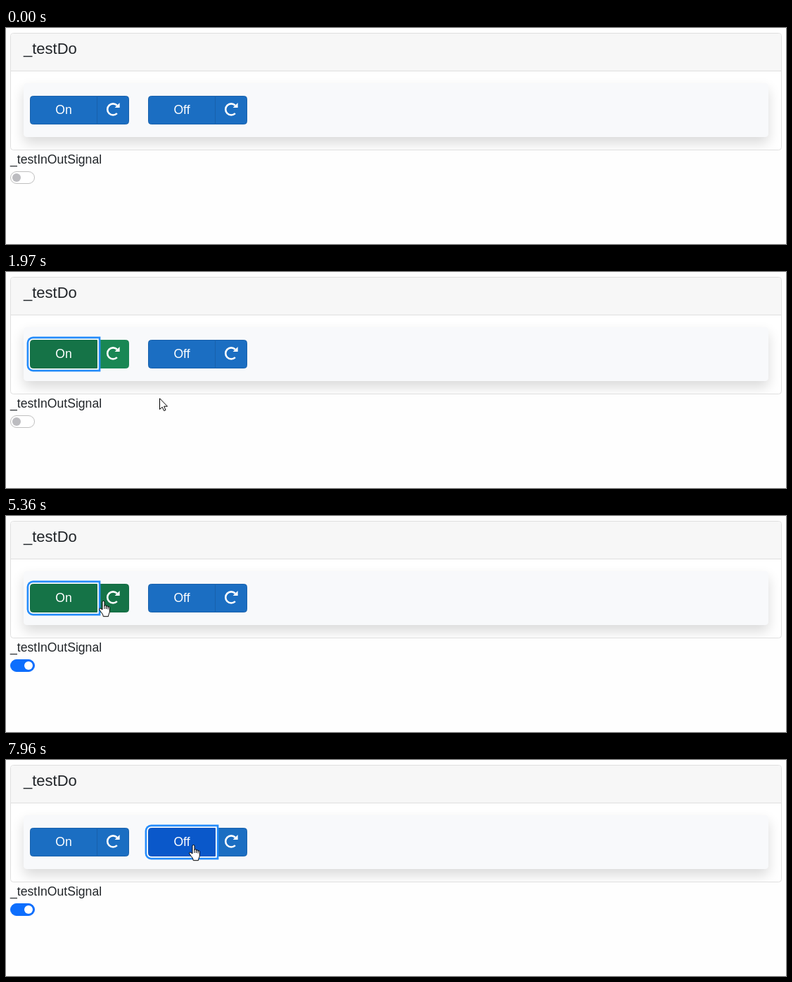
An HTML page that plays this animation: 1109 by 309 pixels, repeating every 8000 ms.

```html
<!DOCTYPE html>
<html lang="en">
<head>
<meta charset="utf-8">
<title>Signal buttons</title>
<style>
:root {
  --blue: #1b6ec2; --blue-edge: #1861ac;
  --blue-dark: #0b5ed7; --blue-dark-edge: #0a58ca;
  --green: #198754; --green-dark: #157347; --green-dark-edge: #146c43;
  --no-ring: 0 0 0 0 #fff, 0 0 0 0 #258cfb;
  --ring: 0 0 0 1.76px #fff, 0 0 0 4.4px #258cfb;
}
* { box-sizing: border-box; }
html, body { margin: 0; width: 1109px; height: 309px; overflow: hidden; }
body {
  position: relative; background: #fefefe; color: #212529;
  font: 17.6px/26.4px "Liberation Sans", Arial, sans-serif;
}
body > *, .panel, .btn, .knob, #cursor svg { position: absolute; }

.card {
  left: 6px; top: 7px; width: 1097px; height: 168px;
  background: #fff; border: 1px solid #dfdfdf; border-radius: 4.4px; overflow: hidden;
}
.head {
  height: 54px; padding: 8.8px 18px; background: #f7f7f7;
  border-bottom: 1px solid #dfdfdf; font-size: 22px;
}
.panel {
  left: 18px; top: 71px; width: 1059px; height: 77px;
  background: #f8f9fb; border-radius: 4.4px;
  box-shadow: 0 8.8px 17.6px rgba(0, 0, 0, .15);
}
.btn {
  top: 97px; height: 41px; line-height: 39px; text-align: center; color: #fff;
  background: var(--blue); border: 1px solid var(--blue-edge);
  animation: 8s step-end infinite;
}
.main { width: 96px; border-radius: 4.4px 0 0 4.4px; }
.redo { width: 46px; border-radius: 0 4.4px 4.4px 0; z-index: 1; }
.redo svg { position: absolute; left: 13px; top: 9px; width: 18.6px; height: 18.6px; overflow: visible; }
#on { left: 34px; animation-name: on; }
#on-redo { left: 129px; animation-name: on-redo; }
#off { left: 202px; animation-name: off; }
#off-redo { left: 297px; }

.label { left: 6px; top: 175px; }
.switch {
  left: 6px; top: 205px; width: 35px; height: 18px;
  border: 1px solid #bfbfbf; border-radius: 9px; background: #fff;
  animation: switch 8s step-end infinite;
}
.knob {
  left: 2px; top: 2px; width: 12px; height: 12px; border-radius: 50%;
  background: #bcbcc0; animation: knob 8s step-end infinite;
}

#cursor { left: 0; top: 0; z-index: 5; animation: move 8s step-end infinite; }
#cursor svg { overflow: visible; fill: #fff; stroke: #000; stroke-linejoin: round; left: 0; top: 0; }
#arrow { animation: arrow 8s step-end infinite; }
#hand { animation: hand 8s step-end infinite; }

@keyframes on {
  0% { background: var(--blue); border-color: var(--blue-edge); }
  12% { background: var(--blue); border-color: var(--blue-edge); animation-timing-function: steps(2, start); }
  13.75% { background: var(--blue-dark); border-color: var(--blue-dark-edge); box-shadow: var(--no-ring); z-index: 0; }
  14.5% { background: #0a58ca; border-color: #0a53be; box-shadow: var(--no-ring); z-index: 2; animation-timing-function: steps(2, start); }
  16.25% { background: var(--blue-dark); border-color: var(--blue-dark-edge); box-shadow: var(--ring); z-index: 2; }
  22.875% { background: var(--blue-dark); border-color: var(--blue-dark-edge); box-shadow: var(--ring); z-index: 2; animation-timing-function: steps(3, start); }
  25.5% { background: var(--green-dark); border-color: var(--green-dark-edge); box-shadow: var(--ring); z-index: 2; }
  76.375% { background: var(--green-dark); border-color: var(--green-dark-edge); box-shadow: var(--ring); z-index: 0; animation-timing-function: steps(2, start); }
  78.125% { background: var(--green); border-color: var(--green); box-shadow: var(--no-ring); z-index: 0; }
  85.625% { background: var(--green); border-color: var(--green); box-shadow: var(--no-ring); z-index: 0; animation-timing-function: steps(3, start); }
  88.25%, 100% { background: var(--blue); border-color: var(--blue-edge); box-shadow: var(--no-ring); z-index: 0; }
}
@keyframes on-redo {
  0% { background: var(--blue); border-color: var(--blue-edge); }
  22.875% { background: var(--blue); border-color: var(--blue-edge); animation-timing-function: steps(3, start); }
  25.5% { background: var(--green); border-color: var(--green); }
  54.25% { background: var(--green); border-color: var(--green); animation-timing-function: steps(2, start); }
  56% { background: var(--green-dark); border-color: var(--green-dark-edge); }
  61.06% { background: var(--green); border-color: var(--green); animation-timing-function: steps(2, start); }
  62.8% { background: var(--green-dark); border-color: var(--green-dark-edge); }
  67.875% { background: var(--green-dark); border-color: var(--green-dark-edge); animation-timing-function: steps(2, start); }
  69.6% { background: var(--green); border-color: var(--green); }
  73.75% { background: var(--green); border-color: var(--green); animation-timing-function: steps(2, start); }
  75.5% { background: var(--green-dark); border-color: var(--green-dark-edge); box-shadow: var(--no-ring); }
  76.375% { background: #146c43; border-color: #13653f; box-shadow: var(--no-ring); animation-timing-function: steps(2, start); }
  78.125% { background: var(--green-dark); border-color: var(--green-dark-edge); box-shadow: var(--ring); }
  85.625% { background: var(--green-dark); border-color: var(--green-dark-edge); box-shadow: var(--ring); animation-timing-function: steps(3, start); }
  88.25% { background: var(--blue-dark); border-color: var(--blue-dark-edge); box-shadow: var(--ring); }
  97.75% { background: var(--blue-dark); border-color: var(--blue-dark-edge); box-shadow: var(--ring); animation-timing-function: steps(2, start); }
  99.4%, 100% { background: var(--blue); border-color: var(--blue-edge); box-shadow: var(--no-ring); }
}
@keyframes off {
  0% { background: var(--blue); border-color: var(--blue-edge); }
  96% { background: var(--blue); border-color: var(--blue-edge); animation-timing-function: steps(2, start); }
  97.75% { background: var(--blue-dark); border-color: var(--blue-dark-edge); box-shadow: var(--no-ring); z-index: 2; animation-timing-function: steps(2, start); }
  99.4%, 100% { background: #0a58ca; border-color: #0a53be; box-shadow: var(--ring); z-index: 2; }
}
@keyframes switch {
  0% { background: #fff; border-color: #bfbfbf; }
  35.625%, 100% { background: #0d6efd; border-color: #0d6efd; }
}
@keyframes knob {
  0% { background: #bcbcc0; transform: none; }
  35.625% { background: #fff; transform: none; animation-timing-function: steps(3, start); }
  38.25%, 100% { background: #fff; transform: translateX(17px); }
}
@keyframes move {
  0%, 3.25% { transform: translate(828px, 297px); animation-timing-function: steps(8); }
  10.25% { transform: translate(140px, 152px); animation-timing-function: steps(3); }
  12.875% { transform: translate(100px, 125px); }
  15.375% { transform: translate(100px, 125px); animation-timing-function: steps(4); }
  18.75% { transform: translate(218px, 180px); }
  46.5% { transform: translate(212px, 180px); animation-timing-function: steps(10); }
  55.125% { transform: translate(140px, 132px); }
  57.625% { transform: translate(140px, 132px); animation-timing-function: steps(4); }
  61.06% { transform: translate(127px, 124px); animation-timing-function: steps(3); }
  63.625% { transform: translate(140px, 122px); }
  67% { transform: translate(138px, 121px); animation-timing-function: steps(3); }
  69.625% { transform: translate(105px, 121px); }
  72% { transform: translate(105px, 121px); animation-timing-function: steps(3); }
  74.625% { transform: translate(146px, 122px); }
  77.25% { transform: translate(146px, 122px); animation-timing-function: steps(6); }
  82.375% { transform: translate(286px, 203px); }
  91.75% { transform: translate(286px, 203px); animation-timing-function: steps(6); }
  96.875%, 100% { transform: translate(266px, 121px); }
}
@keyframes arrow {
  0%, 12%, 54.25%, 96%, 100% { opacity: 0; }
  3.25%, 16.2%, 78.9% { opacity: 1; }
}
@keyframes hand {
  0%, 16.2%, 78.9% { opacity: 0; }
  12%, 54.25%, 96%, 100% { opacity: 1; }
}
</style>
</head>
<body>
<div class="card">
  <div class="head">_testDo</div>
  <div class="panel"></div>
</div>

<div class="btn main" id="on">On</div>
<div class="btn redo" id="on-redo">
  <svg viewBox="0 0 8 8">
    <g id="reload">
      <path d="M6.4 6.5A3.45 3.45 0 1 1 6.4 1.6" fill="none" stroke="#fff" stroke-width="1.1"/>
      <path d="M8 0v3H5z" fill="#fff"/>
    </g>
  </svg>
</div>
<div class="btn main" id="off">Off</div>
<div class="btn redo" id="off-redo"><svg viewBox="0 0 8 8"><use href="#reload"/></svg></div>

<div class="label">_testInOutSignal</div>
<div class="switch"><div class="knob"></div></div>

<div id="cursor">
  <svg id="arrow" width="12" height="19">
    <path d="M.5 .8V16.5L4.2 13.2 6.6 18.5 9 17.5 6.7 12.2H11.5z"/>
  </svg>
  <!-- The fingertip sits on the pointer position. -->
  <svg id="hand" width="16" height="24" viewBox="6 0 16 24">
    <path d="M5 13V2a1.5 1.5 0 0 1 3 0V8a1.3 1.3 0 0 1 2.6 0v.8a1.2 1.2 0 0 1 2.4 .2v.8a1.15 1.15 0 0 1 2.3 .2V15.5c0 3-1.8 3.7-1.8 7.2H6.3C6.3 19 2.6 16.5.8 13c-.8-1.6 1-2.6 2.1-1.5z"/>
    <path d="M8 8v4M10.6 9v3M13 10v2.5" fill="none"/>
  </svg>
</div>
</body>
</html>
```
